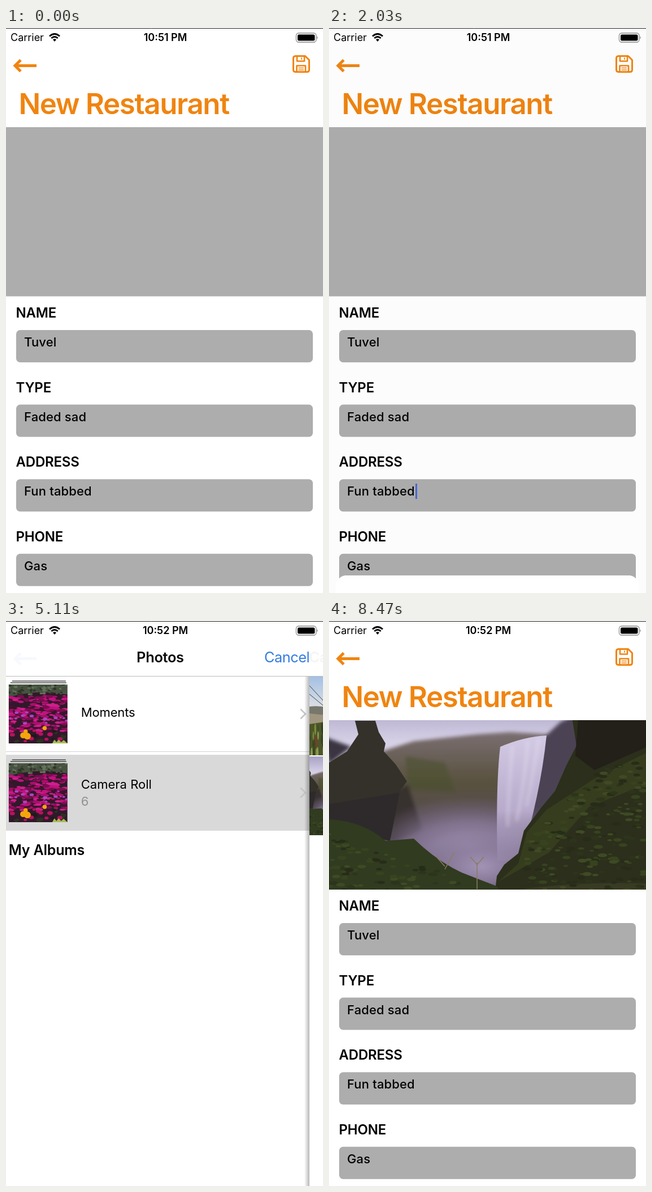
Animation, 561 px wide and 997 px high, one loop 8.54 s. Source, as an HTML page:

```html
<!DOCTYPE html>
<html lang="en">
<head>
<meta charset="utf-8">
<title>New Restaurant form</title>
<style>
html, body { margin: 0; width: 100%; height: 100%; overflow: hidden; background: #fff; }
#stage { display: block; width: 561px; height: 997px; font-family: Inter, Roboto, sans-serif; }
.orange { fill: #f08410; }
.heading { font-size: 51px; font-weight: 600; letter-spacing: -.027em; }
.label { font-size: 24px; font-weight: 600; letter-spacing: -.2px; }
.value { font-size: 22px; font-weight: 500; letter-spacing: .15px; }
.field { fill: #adadad; }
.nav { font-size: 25.4px; letter-spacing: -.5px; }
.nav.bold { letter-spacing: -.3px; }
.bold { font-weight: 600; }
.row { font-size: 22px; }
.blue { fill: #357ce0; }
.option { font-size: 29px; letter-spacing: -.8px; fill: #3d7dca; text-anchor: middle; }
.line { fill: none; stroke: currentColor; }

.dim, .sheet, .tint, .picker, .page-in, .page-out, .title-out, .title-in, .back, .fade,
.pressed, .shadow, .caret, .photo, .early, .late {
  animation: 8540ms ease infinite paused;
}
.dim { animation-name: dim; }
.sheet { animation-name: sheet; }
.tint { animation-name: tint; }
.picker { animation-name: picker; }
.page-in { animation-name: page-in; }
.page-out { animation-name: page-out; }
.title-out { animation-name: title-out; }
.title-in { animation-name: title-in; }
.back { animation-name: back; }
.fade { animation-name: fade; }
.pressed, .shadow, .caret, .photo, .early, .late { animation-timing-function: step-end; }
.pressed { animation-name: pressed; }
.shadow { animation-name: shadow; }
.caret { animation-name: caret; }
.photo { animation-name: photo; }
.early { animation-name: early; }
.late { animation-name: late; }

@keyframes dim { 0%, 9.016% { opacity: 0 } 13.934%, 20.796% { opacity: 1 } 24.59%, 100% { opacity: 0 } }
@keyframes sheet {
  0%, 9.016% { transform: translateY(282px) }
  13.934%, 20.796% { transform: none }
  25.714%, 100% { transform: translateY(282px) }
}
@keyframes tint { 0%, 9.016% { color: #f08410 } 13.934%, 20.796% { color: #bebebe } 24.59%, 100% { color: #f08410 } }
@keyframes picker {
  0%, 45.82% { transform: translateY(997px) }
  52.377%, 77.869% { transform: translateY(0) }
  83.724%, 100% { transform: translateY(997px) }
}
@keyframes page-in { 0%, 59.485% { transform: translateX(561px) } 65.34%, 100% { transform: translateX(0) } }
@keyframes page-out { 0%, 59.485% { transform: translateX(0) } 65.34%, 100% { transform: translateX(-168px) } }
@keyframes title-out {
  0%, 59.485% { transform: translateX(0); opacity: 1 }
  65.34%, 100% { transform: translateX(-177px); opacity: 0 }
}
@keyframes title-in {
  0%, 59.485% { transform: translateX(343px); opacity: 0 }
  65.34%, 100% { transform: translateX(0); opacity: 1 }
}
@keyframes back {
  0%, 59.485% { transform: translateX(177px); opacity: 0 }
  65.34%, 100% { transform: translateX(0); opacity: 1 }
}
@keyframes fade { 0%, 59.485% { opacity: 0 } 65.34%, 100% { opacity: 1 } }
@keyframes pressed { 0% { opacity: 0 } 58.197%, 100% { opacity: 1 } }
@keyframes shadow { 0% { opacity: 0 } 59.485%, 100% { opacity: 1 } }
@keyframes caret { 0% { opacity: 0 } 20.796% { opacity: 1 } 28.689%, 100% { opacity: 0 } }
@keyframes photo { 0% { opacity: 0 } 77.869%, 100% { opacity: 1 } }
@keyframes early { 0% { opacity: 1 } 55.035%, 100% { opacity: 0 } }
@keyframes late { 0% { opacity: 0 } 55.035%, 100% { opacity: 1 } }
</style>
</head>
<body>
<svg id="stage" viewBox="0 0 561 997" xmlns="http://www.w3.org/2000/svg">
  <defs>
    <linearGradient id="edge"><stop stop-opacity="0"/><stop offset="1" stop-opacity=".28"/></linearGradient>
    <linearGradient id="lilac" x2="0" y2="1"><stop stop-color="#a9a1c4"/><stop offset=".2" stop-color="#d6d0e6"/></linearGradient>
    <linearGradient id="hill" x2="0" y2="1"><stop stop-color="#7b6f72"/><stop offset=".3" stop-color="#59523f"/><stop offset=".7" stop-color="#54485a"/><stop offset="1" stop-color="#45394a"/></linearGradient>
    <linearGradient id="water" x2="0" y2="1"><stop stop-color="#d3cae4"/><stop offset=".6" stop-color="#b7aacb"/><stop offset="1" stop-color="#9f91b4" stop-opacity=".3"/></linearGradient>
    <radialGradient id="mist"><stop stop-color="#a294b6"/><stop offset=".5" stop-color="#8b7c9c" stop-opacity=".8"/><stop offset="1" stop-color="#7a6b88" stop-opacity="0"/></radialGradient>
    <linearGradient id="haze" x2="0" y2="1"><stop stop-color="#a4c0e4"/><stop offset=".5" stop-color="#ece8e4"/></linearGradient>
    <linearGradient id="dusk" x2="0" y2="1"><stop stop-color="#4a74b4"/><stop offset=".35" stop-color="#f0e0cb"/></linearGradient>
    <filter id="soft"><feGaussianBlur stdDeviation="3"/></filter>
    <filter id="fine"><feGaussianBlur stdDeviation=".7"/></filter>

    <g id="falls">
      <rect width="561" height="374" fill="url(#lilac)"/>
      <g filter="url(#soft)">
        <path d="M-9 66L40 84L0 115z" fill="#3b3543"/>
        <path d="M60 105L100 90L150 74L260 62L320 58L390 62L400 345H60z" fill="url(#hill)"/>
        <path d="M135 100L205 112L225 165L140 160z" fill="#4c5030" opacity=".6"/>
        <path d="M375 72L410 40L455 20V150L345 245z" fill="#4b4353"/>
        <path d="M75 180L140 150L165 230L110 255z" fill="#37302f"/>
        <ellipse cx="250" cy="262" rx="190" ry="90" fill="url(#mist)"/>
        <ellipse cx="270" cy="295" rx="110" ry="60" fill="url(#mist)"/>
      </g>
      <path d="M303 84Q345 66 385 64Q374 170 338 285L298 285Q295 150 303 84z" fill="url(#water)" filter="url(#fine)"/>
      <path d="M325 82Q318 150 316 225M352 74Q346 150 332 215M371 70Q362 130 349 190" fill="none" stroke="#eeeaf6" stroke-width="5" opacity=".35" filter="url(#soft)"/>
      <g filter="url(#fine)">
        <path d="M425 0H561V374H290L297 312L310 292L335 272L345 232L375 192L400 162L420 117L438 82z" fill="#2b2f1b"/>
        <path d="M335 290L350 235L385 195L470 140L561 95V150L460 190L390 270L300 322z" fill="#363d1e"/>
        <path d="M442 20L561 0V85L470 125L436 100z" fill="#222018"/>
        <path d="M46 38H82L88 58L100 78L97 92L118 115L138 145L118 172L60 188L0 195V112L32 92L52 62z" fill="#34312a"/>
        <path d="M0 185L125 165L108 250L0 230z" fill="#2e2a2b"/>
        <path d="M0 212Q60 215 100 250L150 246Q190 285 235 306L297 330L330 374H0z" fill="#303b20"/>
        <path d="M190 374Q330 318 561 325V374z" fill="#383a22"/>
        <g id="moss"/>
        <path d="M262 335V288M250 278L262 292L274 278M205 300L222 270M190 278L205 295" fill="none" stroke="#8b7c64" stroke-width="1.500"/>
      </g>
    </g>

    <symbol id="flowers" viewBox="0 0 139 139">
      <rect width="139" height="139" fill="#30192a"/>
      <path d="M0 0H139V24Q70 10 0 30z" fill="#46523f"/>
      <g filter="url(#fine)">
        <g id="leaves"/><g id="petals"/>
        <g fill="#f5a50c"><circle cx="34" cy="120" r="7"/><circle cx="44" cy="122" r="8"/><circle cx="40" cy="111" r="5"/><circle cx="85" cy="103" r="5"/></g>
      </g>
      <path d="M103 139L108 130L113 136L118 130L124 136L130 131L139 139z" fill="#a7bd55"/>
    </symbol>

    <symbol id="dune" viewBox="0 0 139 139">
      <rect width="139" height="139" fill="url(#haze)"/>
      <g filter="url(#fine)">
        <path d="M0 53Q25 50 48 60Q85 48 139 33V90H0z" fill="#77776b"/>
        <path d="M0 65Q50 72 80 62L139 55V100H0z" fill="#a0957f"/>
        <path d="M0 84L40 78L139 70V139H0z" fill="#4c5629"/>
        <g id="reeds"/>
      </g>
      <path d="M0 16L46 66M0 31L40 64" fill="none" stroke="#39423d" stroke-width="1"/>
      <path d="M80 88L104 84L98 98H86z" fill="#f3efab"/>
    </symbol>

    <symbol id="garden" viewBox="0 0 139 139">
      <rect width="139" height="139" fill="#86a53a"/>
      <g id="foliage" filter="url(#soft)"/>
      <path d="M28 0Q34 60 0 139M28 45L100 20M75 0L62 50" fill="none" stroke="#40501c" stroke-width="2"/>
      <ellipse cx="50" cy="78" rx="15" ry="20" fill="#446320"/>
      <path d="M56 47Q78 50 78 77Q72 95 58 98z" fill="#dbbd13"/>
    </symbol>

    <symbol id="lagoon" viewBox="0 0 139 139">
      <rect width="139" height="139" fill="url(#dusk)"/>
      <g filter="url(#fine)">
        <path d="M70 38Q110 27 139 32V72H70z" fill="#b0a48f"/>
        <ellipse cx="122" cy="52" rx="22" ry="13" fill="#f3e8db"/>
        <path d="M70 34Q92 38 108 68H74z" fill="#f7f0e7"/>
        <path d="M45 70Q90 62 139 70V112H45z" fill="#9a938b"/>
        <path d="M0 0H38L48 26L70 38L72 68L45 72H0z" fill="#2c2010"/>
        <path d="M0 65L45 70L75 92L139 106V139H0z" fill="#402c10"/>
        <g id="scrub"/>
      </g>
    </symbol>

    <symbol id="gorge" viewBox="0 0 139 139">
      <rect width="139" height="139" fill="#312c25"/>
      <g filter="url(#fine)">
        <path d="M0 0H22Q20 50 24 75L0 110z" fill="#b9b9bf"/>
        <path d="M80 0H139V38Q100 48 75 75Q55 100 44 139H0V118Q30 65 66 42z" fill="#d4d4d9"/>
        <path d="M139 2Q108 18 92 0zM100 30L139 12V30z" fill="#77746f"/>
        <path d="M8 139Q25 75 92 34M32 139Q45 85 105 38" fill="none" stroke="#fff" stroke-width="7" opacity=".65"/>
        <path d="M82 82L105 58L139 46V118L105 130L62 120z" fill="#4b4512"/>
        <path d="M112 62L139 58V100L120 112z" fill="#33291a"/>
      </g>
    </symbol>

    <g id="arrow" class="line"><path d="M17 66.500H54" stroke-width="5"/><path d="M26 56.500L16 66.500L26 76.500" stroke-width="5"/></g>
    <g id="thumb">
      <path d="M18 106H113M15 109H114" stroke="#444" stroke-width="1.600"/>
      <use href="#flowers" x="12" y="112" width="104" height="104"/>
    </g>
    <path id="chevron" d="M528.500 155.500L537 164L528.500 172.500" fill="none" stroke="#c4c4c8" stroke-width="2.600"/>
  </defs>

  <rect width="561" height="997" fill="#fff"/>

  <g class="tint" color="#f08410">
    <use href="#arrow"/>
    <g class="line" stroke-width="3" stroke-linejoin="round">
      <path d="M512.500 49.500H529.500L536.500 56.500V73.500Q536.500 77.500 532.500 77.500H512.500Q508.500 77.500 508.500 73.500V53.500Q508.500 49.500 512.500 49.500z"/>
      <path d="M515 50V58.500H528V50M514.500 77V66.500H530V77" stroke-width="2.600"/>
      <path d="M523 52v4M517.500 70.500h9.500M517.500 74h9.500" stroke-width="1.600"/>
    </g>
  </g>
  <text class="heading orange" x="22.500" y="152">New Restaurant</text>
  <rect class="field" y="175" width="561" height="298.500"/>
  <svg class="photo" y="175" width="561" height="298.500" viewBox="0 37 561 298.500"><use href="#falls"/></svg>
  <g id="form"></g>
  <rect class="caret" x="153" y="804" width="3" height="27" fill="#4a68d8"/>

  <rect class="dim" width="561" height="997" fill="#000" fill-opacity=".4"/>
  <g class="sheet">
    <rect x="12" y="715" width="537" height="271.500" rx="20" fill="#fff"/>
    <path d="M12 815H549M12 901H549" stroke="#dcdcdc" stroke-width="1.200"/>
    <text x="280.500" y="773" font-size="19.500" letter-spacing="-.25" fill="#8f8f8f" text-anchor="middle">Choose your photo source</text>
    <text class="option" x="280" y="869">Camera</text>
    <text class="option" x="280" y="955">Photo library</text>
  </g>

  <g class="picker">
    <rect width="561" height="997" fill="#fff"/>
    <g class="page-out">
      <rect class="pressed" y="236" width="580" height="134" fill="#d9d9d9"/>
      <path d="M0 230.500H580" stroke="#d2d2d4" stroke-width="1.200"/>
      <use href="#thumb"/><use href="#thumb" y="139"/>
      <use href="#chevron"/><use href="#chevron" y="139"/>
      <text class="row" x="140" y="169" letter-spacing="-.15">Moments</text>
      <text class="row" x="140" y="296">Camera Roll</text>
      <text class="row" x="140" y="326" fill="#929292">6</text>
      <text class="bold" x="12" y="413" font-size="25" letter-spacing="-.2">My Albums</text>
    </g>
    <g class="page-in">
      <rect class="shadow" x="-9" y="97" width="9" height="900" fill="url(#edge)"/>
      <rect y="97" width="561" height="900" fill="#fff"/>
      <use href="#dune" y="98" width="139" height="139"/>
      <use href="#garden" x="141" y="98" width="139" height="139"/>
      <use href="#lagoon" x="281.500" y="98" width="139" height="139"/>
      <use href="#gorge" x="422" y="98" width="139" height="139"/>
      <svg y="239" width="139" height="139" viewBox="93 0 374 374"><use href="#falls"/></svg>
      <use href="#flowers" x="141" y="239" width="139" height="139"/>
    </g>
    <rect width="561" height="97" fill="#fff"/>
    <path d="M0 97.500H561" stroke="#bcbcbe" stroke-width="1.200"/>
    <g class="fade" color="#2f7df6"><use href="#arrow"/></g>
    <text class="nav blue back" x="61" y="73">Photos</text>
    <text class="nav bold title-out" x="280.500" y="73" text-anchor="middle">Photos</text>
    <text class="nav bold title-in" x="280" y="73" text-anchor="middle">Camera Roll</text>
    <text class="nav blue" x="457" y="73">Cancel</text>
  </g>

  <path d="M0 .5H561" stroke="#222"/>
  <text x="8" y="23" font-size="18">Carrier</text>
  <g class="bold" font-size="18" text-anchor="middle">
    <text class="early" x="282" y="23">10:51 PM</text>
    <text class="late" x="282" y="23">10:52 PM</text>
  </g>
  <g fill="none" stroke="#000" stroke-width="2.800">
    <path d="M77 14.500Q86 6.500 95 14.500M80.300 18Q86 13 91.700 18"/>
    <path d="M83 20.500Q86 18 89 20.500L86 24z" fill="#000" stroke="none"/>
  </g>
  <rect x="513.500" y="9" width="35.500" height="16" rx="4.500" fill="none" stroke="#8a8a8a" stroke-width="1.300"/>
  <rect x="516" y="11.500" width="30.500" height="11" rx="2.500"/>
  <path d="M550.500 14.500Q553 17 550.500 19.500z" fill="#777"/>
</svg>
<script>
const LOOP = 8540, STEP = 70;
const find = id => document.getElementById(id);

const fields = [["NAME", "Tuvel"], ["TYPE", "Faded sad"], ["ADDRESS", "Fun tabbed"], ["PHONE", "Gas"]];
find("form").innerHTML = fields.map(([label, value], i) => `
  <g transform="translate(0 ${i * 131.6})">
    <text class="label" x="17.5" y="511">${label}</text>
    <rect class="field" x="18" y="533" width="525" height="57" rx="7"/>
    <text class="value" x="32" y="562">${value}</text>
  </g>`).join("");

let seed = 7;
const random = () => (seed = seed * 16807 % 2147483647) / 2147483647;

// Fills a box with soft blots; inside() can trim it to a region.
function scatter(id, count, [x, y, w, h], [rx, ry], colours, inside = () => true) {
  let blots = "";
  for (let i = 0; i < count; i++) {
    const cx = x + random() * w, cy = y + random() * h, k = .6 + random() * .8;
    const fill = colours[Math.floor(random() * colours.length)];
    if (inside(cx, cy)) {
      blots += `<ellipse cx="${cx.toFixed(1)}" cy="${cy.toFixed(1)}" rx="${rx * k}" ry="${ry * k}" fill="${fill}"/>`;
    }
  }
  find(id).innerHTML += blots;
}

scatter("moss", 900, [0, 90, 561, 284], [6, 2.5], ["#37431f", "#3f4a25", "#272c18", "#2c351b"],
  (x, y) => (x < 230 && y > 235 + x * .35) || (x > 350 && y > 560 - x * .9 && y > 110));
scatter("leaves", 90, [0, 0, 139, 24], [3, 2], ["#66735c", "#2d3626", "#4c5945"]);
scatter("petals", 260, [0, 27, 139, 84], [6.5, 2.6], ["#c3127f", "#a80f6b", "#cf1f8c", "#7d0c4f", "#41132f"]);
scatter("petals", 14, [0, 62, 139, 30], [4, 2.5], ["#a648c4"]);
scatter("petals", 26, [0, 108, 139, 28], [5, 3.5], ["#b8125f", "#2a3320", "#1c1a1a"]);
scatter("reeds", 110, [0, 88, 139, 50], [1.4, 9], ["#7d8c3c", "#3c4a22", "#7c3c2c", "#8a9a52", "#33401e"]);
scatter("foliage", 75, [0, 0, 139, 139], [13, 9], ["#b9cf63", "#6d8f2a", "#cddc88", "#4b6c22", "#83a636"]);
scatter("scrub", 90, [0, 72, 139, 67], [5, 2.5], ["#63491a", "#2a1d0b", "#56601c"], (x, y) => y > 74 + x * .26);

// The picture advances in even steps, so the keyframes are sought rather than run freely.
const animations = document.getAnimations();
function show() {
  const time = Math.floor(performance.now() % LOOP / STEP) * STEP;
  for (const animation of animations) animation.currentTime = time;
  requestAnimationFrame(show);
}
show();
</script>
</body>
</html>
```
